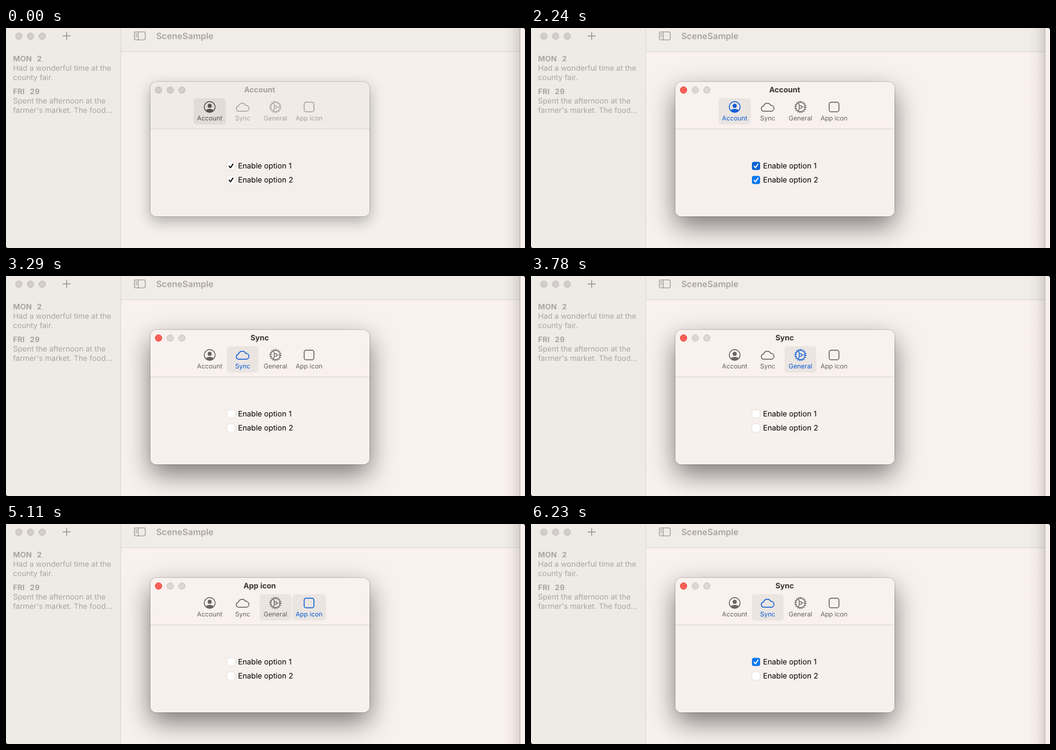
Animation of 888 by 376 pixels, one loop 7.07 s. Source, as an HTML page:

```html
<!DOCTYPE html>
<html lang="en">
<head>
<meta charset="utf-8">
<title>Settings window</title>
<style>
  html, body { margin: 0; width: 100%; height: 100%; overflow: hidden; background: #f9f1ee; }
  svg { position: absolute; left: 0; top: 0; width: 888px; height: 376px; }
  text { font: 12.85px Inter, sans-serif; white-space: pre; text-rendering: geometricPrecision; }
  .bold { font-weight: 700; }
  .date { letter-spacing: .2px; word-spacing: 1.1px; }
  .dim { fill: #aaa5a1; }
  .light { fill: #d2cdca; stroke: #c2bdba; }
  .line { stroke: #dad5d1; }
  #page { fill: #f9f1ee; }
  #panel {
    position: absolute; left: 247px; top: 92px; width: 375px; height: 230px;
    border-radius: 10px; background: linear-gradient(#f9f1ee 80px, #f7f0ec 80px);
    box-shadow: 0 0 0 .6px rgba(0, 0, 0, .3), 0 17px 44px rgba(0, 0, 0, .5);
  }
  #close { fill: #fe5f57; stroke: #e2483f; }
  #others { fill: #ddd7d4; stroke: #cbc5c2; }
  #title { fill: #37332f; text-anchor: middle; }
  .tab { --ink: #676260; }
  .tab text { font-size: 11px; text-anchor: middle; fill: var(--ink); }
  .tab .back { fill: #eae5e1; opacity: var(--back, 0); }
  .tab .icon { fill: none; stroke: var(--ink); stroke-width: 1.5; }
  .tab .solid { fill: var(--ink); stroke: none; }
  .tab.selected { --ink: #0c5bd6; --back: 1; }
  .box rect { fill: #fff; stroke: #ddd6d3; stroke-width: .7; }
  .box path { fill: none; stroke: none; stroke-width: 1.9; stroke-linecap: round; stroke-linejoin: round; }
  .box.on rect { fill: #0d78f2; stroke: none; }
  .box.on path { stroke: #fff; }
  .box.pressed rect { fill: #e9e3e0; }
  .box.on.pressed rect { fill: #0862d2; }

  .inactive #page { fill: #f5f0ec; }
  .inactive #panel {
    background: linear-gradient(#f0ebe7 80px, #f6eeeb 80px);
    box-shadow: 0 0 0 .6px rgba(0, 0, 0, .28), 0 8px 24px rgba(0, 0, 0, .3);
  }
  .inactive #close, .inactive #others { fill: #d2cdca; stroke: #c2bdba; }
  .inactive #title { fill: #a5a09c; }
  .inactive .tab { --ink: #a8a39f; }
  .inactive .tab.selected { --ink: #55504d; }
  .inactive .tab .back { fill: #e1dcd8; }
  .inactive .box.on rect { fill: #fff; stroke: #ddd6d3; }
  .inactive .box.on path { stroke: #000; }
</style>
</head>
<body>
<svg viewBox="0 0 888 376">
  <defs>
    <linearGradient id="edge">
      <stop offset="0" stop-color="#786e69" stop-opacity="0"/>
      <stop offset=".5" stop-color="#786e69" stop-opacity=".07"/>
      <stop offset="1" stop-color="#786e69" stop-opacity=".24"/>
    </linearGradient>
  </defs>
  <rect id="page" x="197" y="41" width="683" height="335"/>
  <rect x="197" width="683" height="40" fill="#f0ece7"/>
  <rect width="196" height="376" fill="#eeeae6"/>
  <path class="line" d="M196.5 0V376M197 40.5H880"/>
  <rect x="852" width="28" height="376" fill="url(#edge)"/>
  <rect x="880" width="8" height="376" fill="#f8f0ed"/>
  <path d="M879.5 0V376" stroke="#b5aeaa"/>
  <path d="M0 373v3h3Q.5 375.5 0 373M885 0h3v3Q887.5 .5 885 0" fill="#2b2927"/>

  <g class="light">
    <circle cx="22" cy="14" r="5.6"/><circle cx="42" cy="14" r="5.6"/><circle cx="62" cy="14" r="5.6"/>
  </g>
  <path d="M97 13.5H110.5M103.7 6.7V20.3" stroke="#96918d" stroke-width="1.4"/>
  <g fill="none" stroke="#a19c98" stroke-width="1.3">
    <rect x="219.7" y="6.7" width="18.6" height="13.6" rx="2.5"/>
    <path d="M226.2 7V20M221.7 9.7h2.6M221.7 12.2h2.6M221.7 14.7h2.6"/>
  </g>
  <g class="dim">
    <text x="257" y="19" style="font-size:14.8px;font-weight:600">SceneSample</text>
    <text x="12" y="57" class="bold date">MON  2</text>
    <text x="12" y="73">Had a wonderful time at the</text>
    <text x="12" y="89">county fair.</text>
    <text x="12" y="113" class="bold date">FRI  29</text>
    <text x="12" y="129">Spent the afternoon at the</text>
    <text x="12" y="145">farmer's market. The food…</text>
  </g>
</svg>

<div id="panel"></div>
<svg viewBox="0 0 888 376">
  <path class="line" d="M247 172.5H622"/>
  <circle id="close" cx="261" cy="106" r="5.6"/>
  <g id="others"><circle cx="281" cy="106" r="5.6"/><circle cx="301" cy="106" r="5.6"/></g>
  <text id="title" class="bold" x="434" y="110"></text>
  <g id="tabs"></g>
  <g id="boxes"></g>
</svg>

<script>
const LOOP = 7070;
const $ = id => document.getElementById(id);

// label, centre, left edge and width of the highlight, icon around 0,0
const tabs = [
  ['Account', 348.5, 321, 55, `<circle r="9.3"/><g class="solid"><circle cy="-2" r="3.5"/>
    <path d="M-6.8 6.3C-5 2.1 5 2.1 6.8 6.3A9.3 9.3 0 0 1-6.8 6.3Z"/></g>`],
  ['Sync', 405, 378, 54,
    '<path d="M-6.7 7.3A4.4 4.4 0 0 1-7.4-1.4A6.7 6.7 0 0 1 5-2.8A5.1 5.1 0 0 1 6.4 7.3Z"/>'],
  ['General', 461, 434, 54, `<circle r="8" style="stroke-width:1.3"/><circle r="2.4" style="stroke-width:1.2"/>
    <circle r="9.5" pathLength="32" stroke-dasharray=".9 1.1" style="stroke-width:1.8"/>
    <path d="M2.4 0H8M-1.2-2.1L-4-6.9M-1.2 2.1L-4 6.9" style="stroke-width:1.2"/>`],
  ['App icon', 518.5, 490, 57.5, '<rect x="-8.3" y="-8.3" width="16.6" height="16.6" rx="3.4"/>'],
];

$('tabs').innerHTML = tabs.map(([label, x, left, width, icon]) => `<g class="tab">
  <rect class="back" x="${left}" y="120" width="${width}" height="45" rx="5"/>
  <g class="icon" transform="translate(${x} 135)">${icon}</g>
  <text x="${x}" y="158">${label}</text></g>`).join('');

$('boxes').innerHTML = [1, 2].map(n => `<g class="box" transform="translate(385 ${211.8 + n * 24})">
  <rect x="-7" y="-7" width="14" height="14" rx="3.5"/><path d="M-3.2 .4L-.9 3.1 3.3-3.3"/>
  <text x="12" y="4.4">Enable option ${n}</text></g>`).join('');

// Each entry overrides part of the state from its time on.
const ACCOUNT = 0, SYNC = 1, GENERAL = 2, ICON = 3;
const timeline = [
  [0, { active: false, title: ACCOUNT, selected: ACCOUNT, hover: -1, glow: 1, on: [true, true], pressed: -1 }],
  [1400, { active: true }],
  [2240, { pressed: 0 }],
  [2380, { pressed: -1, on: [false, true] }],
  [2590, { pressed: 1 }],
  [2660, { pressed: -1, on: [false, false] }],
  [3010, { hover: SYNC, glow: .5 }],
  [3150, { glow: 1 }],
  [3290, { selected: SYNC, title: SYNC, hover: -1 }],
  [3430, { hover: GENERAL, glow: .5 }],
  [3500, { glow: 1 }],
  [3710, { selected: GENERAL, hover: -1 }],
  [3850, { title: GENERAL }],
  [3990, { hover: ICON, glow: .5 }],
  [4130, { glow: 1 }],
  [4340, { hover: -1 }],
  [4410, { selected: ICON }],
  [4550, { title: ICON }],
  [5040, { hover: GENERAL, glow: .5 }],
  [5110, { glow: 1 }],
  [5320, { hover: -1 }],
  [5390, { selected: SYNC }],
  [5460, { title: SYNC }],
  [6160, { pressed: 0 }],
  [6230, { pressed: -1, on: [true, false] }],
];

const tabNodes = [...$('tabs').children];
const boxNodes = [...$('boxes').children];

function draw(time) {
  const s = Object.assign({}, ...timeline.filter(([at]) => at <= time).map(([, change]) => change));
  document.body.classList.toggle('inactive', !s.active);
  $('title').textContent = tabs[s.title][0];
  tabNodes.forEach((node, i) => {
    node.classList.toggle('selected', i === s.selected);
    if (i === s.hover) node.style.setProperty('--back', s.glow);
    else node.style.removeProperty('--back');
  });
  boxNodes.forEach((node, i) => {
    node.classList.toggle('on', s.on[i]);
    node.classList.toggle('pressed', i === s.pressed);
  });
}

function tick() {
  draw(performance.now() % LOOP);
  requestAnimationFrame(tick);
}
tick();
</script>
</body>
</html>
```
